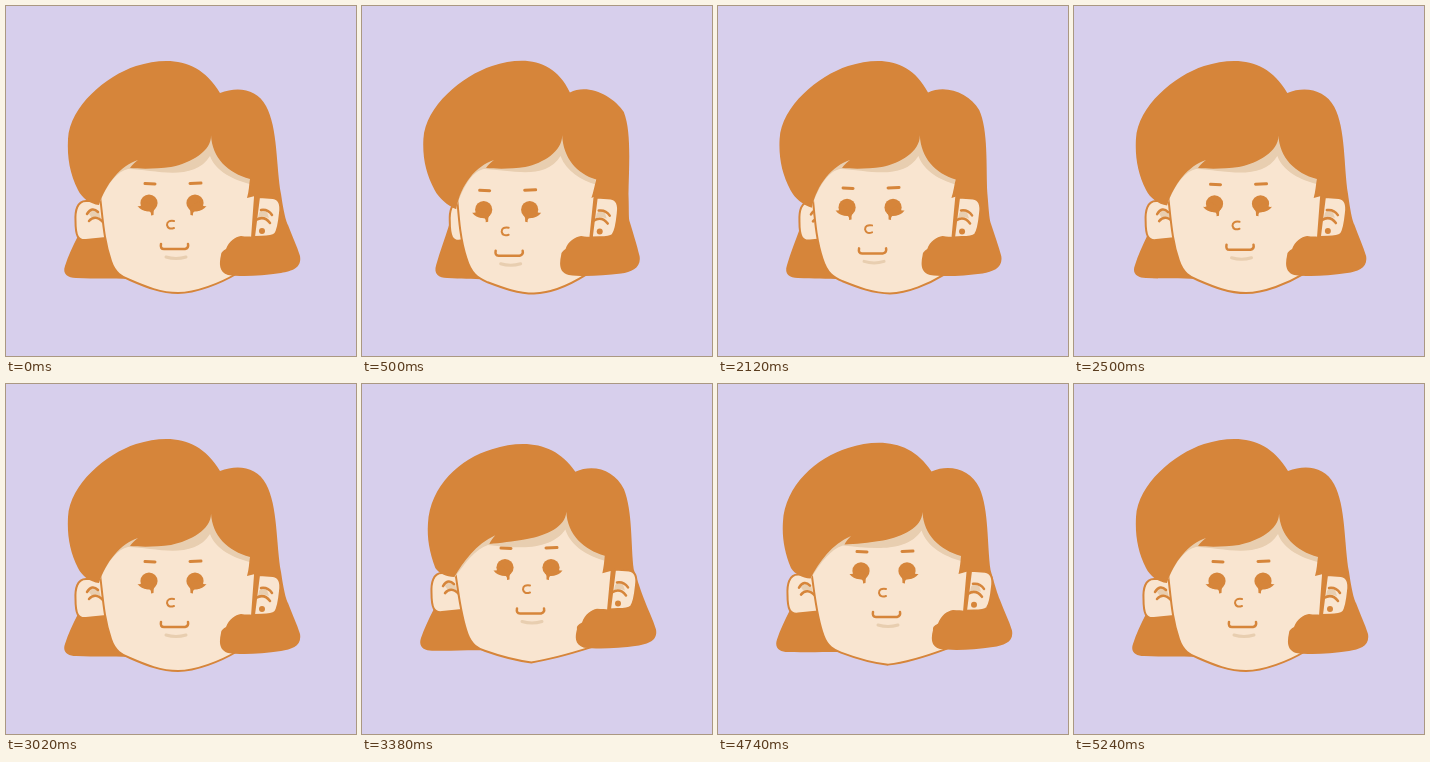
Recreate the animation shown at these times as an HTML page. Size 350 by 350 pixels, loop 5460 ms.

```html
<!DOCTYPE html>
<html lang="en">
<head>
<meta charset="utf-8">
<title>Turning head</title>
<style>
  html, body { margin: 0; width: 100%; height: 100%; overflow: hidden; background: #d7cfec; }
  svg { display: block; width: 100%; height: 100%; }
  .hair { fill: #d6853a; }
  .skin { fill: #f9e5d0; stroke: #d6853a; stroke-width: 2; }
  .shade { fill: #e8ceb0; }
  .line { fill: none; stroke: #d6853a; stroke-width: 2.5; stroke-linecap: round; stroke-linejoin: round; }
  .thick { stroke-width: 3; }
  .thin { stroke-width: 2; }
  .soft { stroke: #e8ceb0; }
</style>
</head>
<body>
<svg viewBox="0 0 350 350">
  <defs>
    <g id="eye" class="hair">
      <circle cx="143" cy="197" r="8.6"/>
      <path d="M131.5 200 Q137 201 139 195 L149 202 Q147 205 147.5 209 L145 209.5 Q145.500 206 143 205 Q136 206 131.5 200Z"/>
    </g>
  </defs>
  <path id="flick" class="hair"/>
  <g id="earL">
    <path class="skin" d="M100 195 L80 195 C71 195 69 205 69.500 215 C69.500 230 72 235 80 234 L100 232"/>
    <path class="shade" d="M83 208 Q88 201 93 206 L95 213 Q90 209 86 212Z"/>
    <path class="line" d="M81 208 Q86 200 92 206 M83 215 Q89 208 97 216"/>
  </g>
  <path id="face" class="skin"/>
  <path id="shadow" class="shade"/>
  <path id="hair" class="hair"/>
  <g id="earR">
    <path class="skin" d="M253 191 L267 192 C274 193 275 200 274 207 C273 217 272 224 269 228 C265 232 255 230 248 231 Z"/>
    <path class="shade" d="M253 207 Q256 202 261 206 L263 212 Q256 209 252 212Z"/>
    <path class="line" d="M255 204 Q262 203 266 209 M250 214 Q258 209 264 217"/>
    <circle class="hair" cx="256" cy="225" r="3"/>
  </g>
  <g id="features">
    <path class="line thick" d="M139 177.5 L149 178 M184 177.5 L195 177"/>
    <use href="#eye"/>
    <use href="#eye" transform="matrix(-1 0 0 1 332 0)"/>
    <path class="line thin" d="M168 215 Q161 214 161 219 Q162 224 168 222"/>
    <path class="line" d="M155 238 Q154 243 158 243 L179 243 Q183 242 182 238"/>
    <path class="line thick soft" d="M160 251 Q170 254 180 251"/>
  </g>
</svg>
<script>
// Each shape in three poses: front, turned, lowered
const shapes = {
  flick: [
    "M84 200 L71 232 C67 240 62 250 59 260 C56 268 62 272 70 272 C90 273 105 272 124 273 L110 200 Z",
    "M95 205 L97 212 C93 228 88 243 84 258 C81 268 86 272 95 272 C105 273 112 273 124 274 L115 205 Z",
    "M80 195 L71 224 C67 232 62 242 59 251 C56 260 62 264 70 264 C90 264 105 263 122 263 L110 200 Z"],
  face: [
    "M96 120 L94 190 C97 215 98 235 105 255 C109 267 116 271 124 274 C140 281 155 287 172 287 C190 287 215 277 230 268 L246 232 L249 191 L249 170 L249 120 Z",
    "M96 120 L96 195 C97 215 99 235 104 250 C109 268 116 273 125 277 C140 282 155 288 172 288 C190 287 205 279 219 270 L217 232 L222 191 L230 170 L230 120 Z",
    "M96 120 L93 188 C97 210 99 230 106 248 C110 258 116 261 122 263 C138 268 153 271 168 274 C185 270 205 266 228 261 L246 224 L250 185 L248 170 L248 120 Z"],
  shadow: [
    "M93 198 C102 176 112 165 122 163 C150 164 188 176 204 150 C210 166 228 174 244 178 L244 120 L100 120 Z",
    "M95 204 C103 176 112 165 122 163 C150 164 180 174 195 150 C201 166 214 174 227 179 L229 120 L100 120 Z",
    "M92 192 C104 180 114 165 128 160 C150 164 188 164 203 143 C208 160 225 171 242 176 L242 120 L100 120 Z"],
  hair: [
    "M93 199 C84 198 76 192 72 184 C64 168 61 152 62 133 C64 100 100 70 130 60 C163 50 194 53 214 87 C232 80 251 83 260 100 C272 122 270 160 275 188 C278 208 280 215 282 219 C286 230 291 240 294 250 C296 262 286 265 275 267 C255 270 235 271 222 269 C213 266 213 258 215 249 C215 246 217 245 220 243 C223 235 229 231 235 230 C240 231 244 230 246 231 L249 190 L241 192 C243 185 243 179 244 173 C222 167 206 152 205 129 C206 145 185 157 165 161 C150 163 135 163 124 162 C126 159 129 156 132 154 C114 160 100 178 93 199 Z",
    "M95 206 C86 200 78 193 73 184 C64 168 60 152 61 133 C63 100 100 70 130 60 C161 50 190 52 204 86 C222 75 252 94 263 110 C268 128 265 160 261 188 C260 200 258 207 258 212 C262 226 265 240 267 250 C269 262 259 266 249 268 C229 270 209 271 197 269 C187 267 187 258 189 249 C189 246 191 245 193 243 C195 235 203 231 209 230 C213 231 216 231 217 231 L222 191 L222 192 C224 187 226 180 228 174 C210 168 198 152 197 129 C197 145 180 157 162 161 C150 163 135 163 124 162 C126 159 129 156 132 154 C114 160 98 178 95 206 Z",
    "M92 190 C84 190 78 188 74 184 C69 168 67 155 68 143 C70 103 97 77 130 68 C163 57 194 62 213 88 C232 79 254 88 263 108 C270 130 268 160 270 184 C276 196 279 205 282 213 C286 224 291 233 294 243 C296 254 286 257 275 259 C255 262 235 262 222 261 C212 258 213 250 215 243 C214 239 217 238 220 236 C223 228 229 223 235 222 C240 222 244 222 246 223 L250 185 L240 188 C241 182 242 176 242 171 C222 165 205 150 204 127 C202 142 185 148 165 152 C150 155 140 157 129 159 C130 156 132 153 134 150 C114 160 102 178 92 190 Z"]
};

// Offsets [x, y] when turned, then when lowered
const shifts = {
  earL: [30, 1, 0, -9],
  earR: [-30, 1, 0, -8.5],
  features: [-35, 11, 0, -20.5]
};

// start, number of steps, ease power, pose [turn, lower] before and after
const moves = [
  { at: 140, steps: 16, power: 2, from: [0, 0], to: [1, 0] },
  { at: 1900, steps: 16, power: 3.2, from: [1, 0], to: [0, 0] },
  { at: 3100, steps: 12, power: 2, from: [0, 0], to: [0, 1] },
  { at: 4580, steps: 10, power: 2, from: [0, 1], to: [0, 0] }
];
const LOOP = 5460, STEP = 74, LEAD = 18;

const byId = id => document.getElementById(id);
const numbers = d => d.match(/-?[\d.]+/g).map(Number);
const morphs = Object.entries(shapes).map(([id, poses]) => ({
  node: byId(id), template: poses[0], values: poses.map(numbers)
}));

function poseAt(t) {
  const move = moves.filter(m => t >= m.at).pop();
  if (!move) return [0, 0];
  const step = Math.floor((t - move.at + LEAD) / STEP) + 1;
  const x = Math.min(1, step / move.steps);
  const p = 1 - (1 - x) ** move.power;
  return move.from.map((v, i) => v + (move.to[i] - v) * p);
}

function draw(t) {
  const [turn, lower] = poseAt(t);
  for (const { node, template, values: [a, b, c] } of morphs) {
    let i = 0;
    node.setAttribute("d", template.replace(/-?[\d.]+/g, () => {
      const v = a[i] + (b[i] - a[i]) * turn + (c[i] - a[i]) * lower;
      i++;
      return v.toFixed(2);
    }));
  }
  for (const id in shifts) {
    const [tx, ty, lx, ly] = shifts[id];
    byId(id).setAttribute("transform", `translate(${tx * turn + lx * lower} ${ty * turn + ly * lower})`);
  }
}

const start = performance.now();
function tick() {
  draw((performance.now() - start) % LOOP);
  requestAnimationFrame(tick);
}
tick();
</script>
</body>
</html>
```
